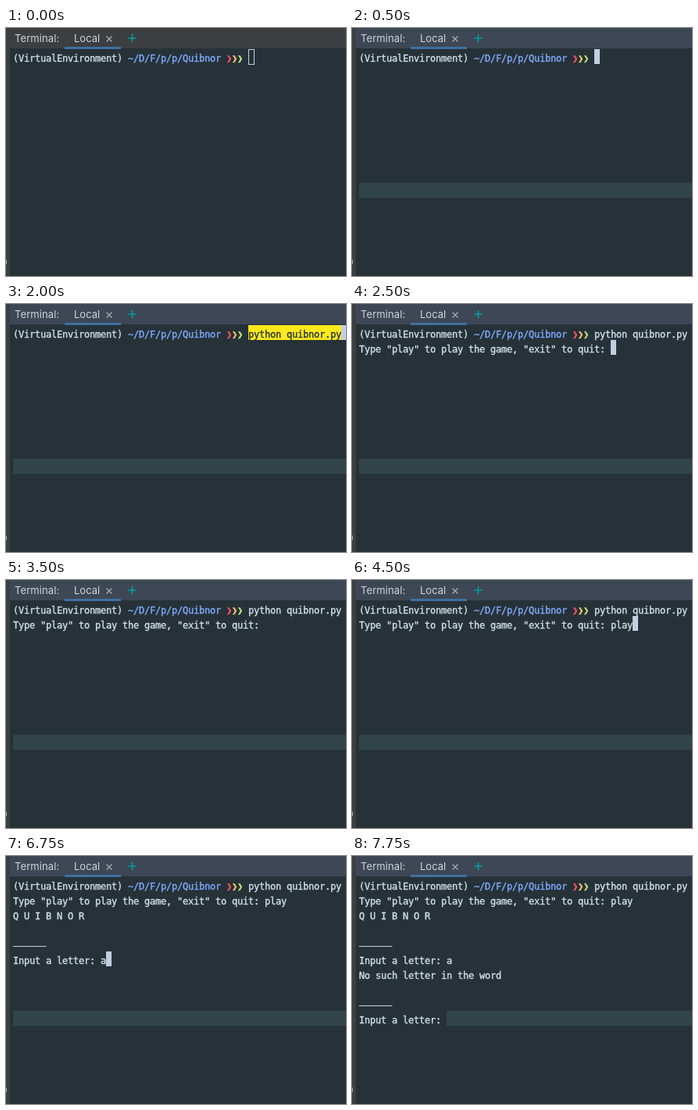
Animation, 435 px wide and 317 px high, one loop 8000 ms. Source, as an HTML page:

```html
<!DOCTYPE html>
<html lang="en">
<head>
<meta charset="utf-8">
<title>Terminal session</title>
<style>
  html, body { margin: 0; width: 100%; height: 100%; overflow: hidden; background: #263238; }
  #stage { position: relative; width: 435px; height: 317px; overflow: hidden; background: #263238; }
  #stage > * { position: absolute; }
  #head { left: 5px; top: 0; width: 430px; height: 26px; background: #3c3f41; }
  #head.focus { background: #3d4755; }
  #side { left: 0; top: 0; width: 5px; height: 317px; background: #3c3f41; }
  #ui { left: 0; top: 0; }
  #ui text { font: 13px Inter, "Open Sans", sans-serif; fill: #d0d4d7; }
  #band { top: 198px; right: 0; height: 19px; background: #314549; }
  #cursor { box-sizing: border-box; width: 7px; height: 19px; background: #c3cee3; }
  #cursor.hollow { width: 8px; height: 20px; background: none; border: 1px solid #c3cee3; }
  .row {
    left: 9px; height: 19px; white-space: pre; color: #d3e0ec;
    font: 12px/24px "DejaVu Sans Mono", monospace; letter-spacing: -.2246px;
    -webkit-text-stroke: .35px;
  }
  .path { color: #82aaff; }
  .arrow { display: inline-block; width: 7px; font-weight: bold; letter-spacing: 0; }
  .mark { display: inline-block; height: 19px; vertical-align: top; background: #fbe91c; color: #263238; }
</style>
</head>
<body>
<div id="stage">
  <div id="head"></div>
  <div id="side"></div>
  <svg id="ui" width="435" height="317">
    <rect x="75" y="24" width="72" height="3" fill="#4070a0"/>
    <text x="11" y="18" letter-spacing=".1">Terminal:</text>
    <text x="87" y="18">Local</text>
    <path d="M128.5 10.5l7 7m0-7l-7 7" stroke="#a9afb3" stroke-width="1.2" fill="none"/>
    <path d="M156.5 13h10m-5-5v10" stroke="#00a3a8" stroke-width="1.5" fill="none"/>
    <rect y="296" width="1" height="6" fill="#a5a9ab"/>
  </svg>
  <div id="band"></div>
  <div id="cursor"></div>
</div>
<script>
const LOOP = 8000, CELL = 7, LINE = 19, LEFT = 9, TOP = 27;
const stage = document.getElementById("stage");
const head = document.getElementById("head");
const band = document.getElementById("band");
const cursor = document.getElementById("cursor");

const arrow = color => `<span class="arrow" style="color:${color}">❯</span>`;
const prompt = '(VirtualEnvironment) <span class="path">~/D/F/p/p/Quibnor</span> ' +
  ["#ff5370", "#ffcb6b", "#c3e88d"].map(arrow).join("") + " ";
const command = "python quibnor.py";
const ask = 'Type "play" to play the game, "exit" to quit: ';
const blanks = "–".repeat(6);
const input = "Input a letter: ";

const rows = Array.from({ length: 10 }, (_, i) => {
  const row = document.createElement("div");
  row.className = "row";
  row.style.top = TOP + i * LINE + "px";
  return stage.insertBefore(row, cursor);
});

// Latest value in a list of [start time, value] steps
const at = (t, steps) => steps.filter(([start]) => t >= start).pop()[1];

const typedCommand = [[0, ""], [1000, command.slice(0, 5)], [2000, command]];
const typedPlay = [[0, ""], [4000, "p"], [4250, "pl"], [4500, "play"]];
const hidden = [[3500, 4000], [5500, 6000], [6500, 6750], [7750, LOOP]];

function screen(t) {
  const cmd = at(t, typedCommand), play = at(t, typedPlay);
  const shown = t >= 2000 && t < 2500 ? `<span class="mark">${cmd}</span>` : cmd;
  const lines = [prompt + shown];
  let place = [43 + cmd.length, 0];
  if (t >= 2500) {
    lines.push(ask + play);
    place = [ask.length + play.length, 1];
  }
  if (t >= 5000) {
    const letter = t >= 6750 ? "a" : "";
    lines.push("Q U I B N O R", "", blanks, input + letter);
    place = [input.length + letter.length, 5];
  }
  if (t >= 7000) {
    lines.push("No such letter in the word", "", blanks, input);
    place = [input.length, 9];
  }
  return { lines, place };
}

function draw(t) {
  const { lines, place: [col, line] } = screen(t);
  rows.forEach((row, i) => {
    const html = lines[i] || "";
    if (row.shown !== html) row.innerHTML = row.shown = html;
  });
  const focus = t >= 500;
  head.className = focus ? "focus" : "";
  band.style.display = focus ? "" : "none";
  band.style.left = (t >= 7000 ? LEFT + input.length * CELL : LEFT) + "px";
  cursor.className = focus ? "" : "hollow";
  cursor.style.left = LEFT + col * CELL + "px";
  cursor.style.top = TOP + line * LINE + "px";
  cursor.style.display = hidden.some(([a, b]) => t >= a && t < b) ? "none" : "";
}

let begin;
function tick(now) {
  begin ??= now;
  draw((now - begin) % LOOP);
  requestAnimationFrame(tick);
}
draw(0);
requestAnimationFrame(tick);
</script>
</body>
</html>
```
